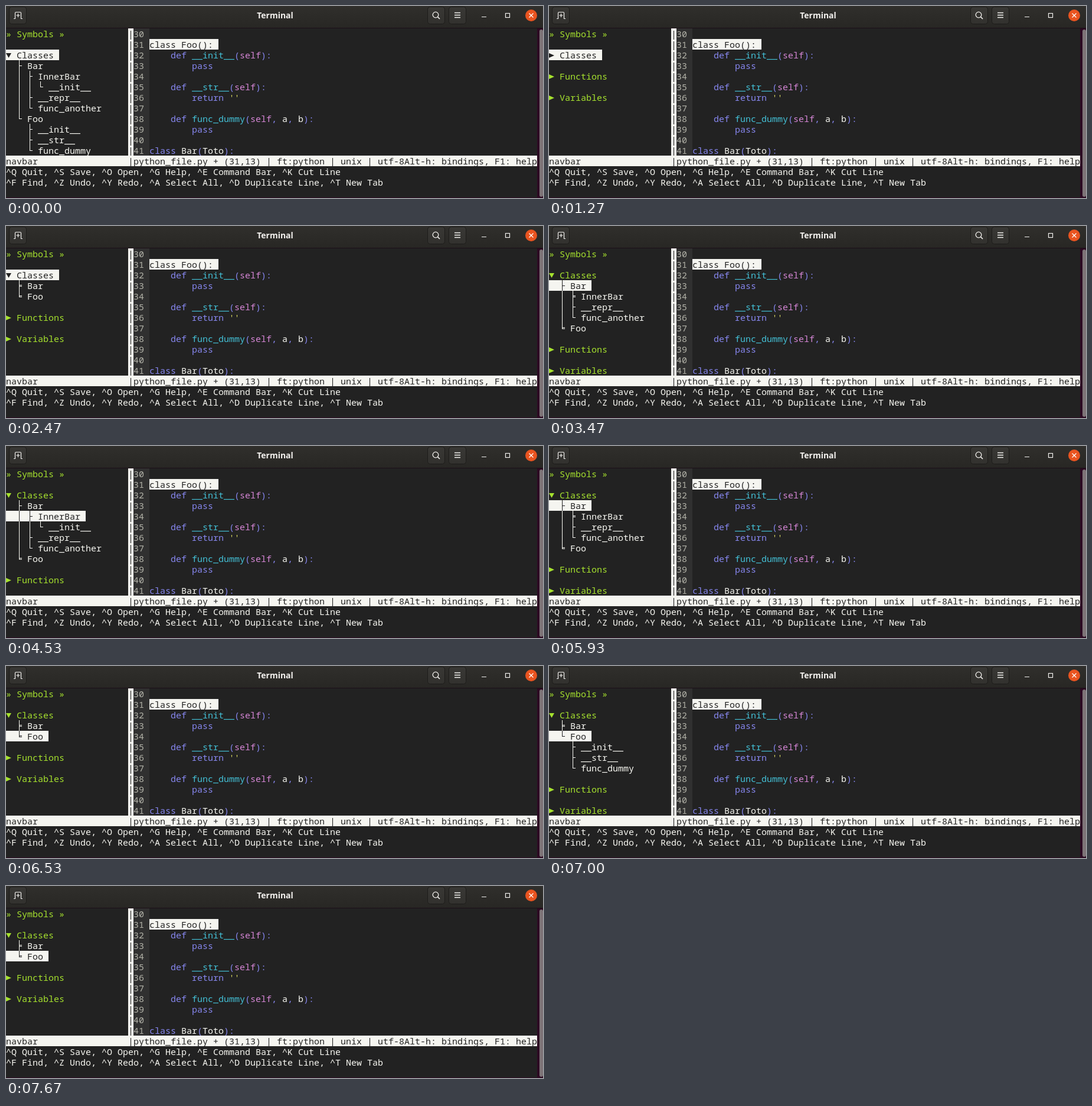
An HTML page for the animation above (8000 ms loop, 910 by 326 pixels).

```html
<!DOCTYPE html>
<html lang="en">
<head>
<meta charset="utf-8">
<title>Symbol browser</title>
<style>
html, body { margin: 0; width: 100%; height: 100%; overflow: hidden; background: #2c0a22; }
svg { display: block; width: 910px; height: 326px; }
.term text { font: 15px "Noto Sans Mono", "DejaVu Sans Mono", monospace; white-space: pre; }
.title { font: bold 14px "Noto Sans", "Open Sans", sans-serif; fill: #f3f1ee; }
</style>
</head>
<body>
<svg viewBox="0 0 910 326">
  <defs>
    <linearGradient id="bar" x2="0" y2="1">
      <stop stop-color="#302f2c"/><stop offset="1" stop-color="#282724"/>
    </linearGradient>
    <linearGradient id="btn" x2="0" y2="1">
      <stop stop-color="#393835"/><stop offset="1" stop-color="#32312e"/>
    </linearGradient>
  </defs>
  <rect width="910" height="326" fill="#2c0a22"/>
  <rect width="910" height="37" fill="url(#bar)"/>
  <rect y="37" width="910" height="1" fill="#1c0f18"/>
  <text class="title" x="456" y="21" text-anchor="middle">Terminal</text>
  <g fill="url(#btn)" stroke="#1d1c1a">
    <rect x="5.5" y="1.5" width="29" height="29" rx="4"/>
    <rect x="714.5" y="1.5" width="29" height="29" rx="4"/>
    <rect x="750.5" y="1.5" width="29" height="29" rx="4"/>
  </g>
  <g fill="none" stroke="#f3f1ee">
    <path d="M13 21.5H15.5V12Q15.5 10.5 17 10.5H24Q25.5 10.5 25.5 12V21.5H28M20.5 13V19M17.5 16H23.5" stroke-width="1.2"/>
    <circle cx="728" cy="15" r="4.8" stroke-width="1.3"/>
    <path d="M731.5 18.5L735 22" stroke-width="1.7"/>
    <path d="M760 11.5H770M760 15.5H770M760 19.5H770" stroke-width="1.4"/>
    <path d="M806 18.5H814"/>
    <rect x="846.5" y="12.5" width="7" height="7" stroke-width="1.2"/>
  </g>
  <circle cx="890" cy="16" r="10" fill="#e95420"/>
  <path d="M886.5 12.5L893.5 19.5M893.5 12.5L886.5 19.5" stroke="#fff" stroke-width="1.3"/>
  <rect y="38" width="900" height="287" fill="#222"/>
  <rect x="904" y="40" width="6" height="284" rx="3" fill="#7d7377"/>
  <g class="term" id="tree"></g>
  <g class="term" id="still"></g>
</svg>
<script>
const CW = 9, RH = 18, TOP = 38, ROWS = 12;
const WHITE = '#f8f8f2', DARK = '#222', PALE = '#f5f5f0', GREEN = '#a6e22e';
const BLUE = '#8787f0', CYAN = '#43c0d6', PINK = '#d787d7', YELLOW = '#d7d75f', GREY = '#b2b2a8';

const rowY = row => TOP + row * RH;
const esc = s => s.replace(/&/g, '&amp;').replace(/</g, '&lt;');
const text = (col, row, s, fill = WHITE) =>
  `<text x="${col * CW}" y="${rowY(row) + 15}" fill="${fill}">${esc(s)}</text>`;
const block = (col, row, cols, rows, fill) =>
  `<rect x="${col * CW}" y="${rowY(row)}" width="${cols * CW}" height="${rows * RH}" fill="${fill}"/>`;

// Editor pane, status line and help
const code = [
  '', 'class Foo():', '    def __init__(self):', '        pass', '',
  '    def __str__(self):', "        return ''", '',
  '    def func_dummy(self, a, b):', '        pass', '', 'class Bar(Toto):'
];

function tokenColor(s, prev) {
  if (/^(class|def|pass|return)$/.test(s)) return BLUE;
  if (s === 'self') return PINK;
  if (s[0] === "'") return YELLOW;
  if (/\W/.test(s)) return BLUE;
  return prev === 'def' ? CYAN : WHITE;
}

function codeLine(line, row) {
  if (row === 1) return block(27, row, 13, 1, PALE) + text(27, row, line, DARK);
  let prev = '';
  return [...line.matchAll(/\w+|'+|[^\w\s']+/g)].map(m => {
    const out = text(27 + m.index, row, m[0], tokenColor(m[0], prev));
    prev = m[0];
    return out;
  }).join('');
}

document.getElementById('still').innerHTML =
  block(23, 0, 1, ROWS, PALE) + block(24, 0, 3, ROWS, '#303030') +
  code.map((line, i) =>
    text(23, i, '|', DARK) + text(24, i, String(30 + i), GREY) + codeLine(line, i)).join('') +
  block(0, 12, 100, 1, PALE) + text(0, 12, 'navbar', DARK) +
  text(23, 12, '|python_file.py + (31,13) | ft:python | unix | utf-8Alt-h: bindings, F1: help', DARK) +
  text(0, 13, '^Q Quit, ^S Save, ^O Open, ^G Help, ^E Command Bar, ^K Cut Line') +
  text(0, 14, '^F Find, ^Z Undo, ^Y Redo, ^A Select All, ^D Duplicate Line, ^T New Tab');

// Symbol tree
const node = (name, ...kids) => ({ name, kids });
const classes = node('Classes',
  node('Bar',
    node('InnerBar', node('__init__')),
    node('__repr__'), node('func_another')),
  node('Foo', node('__init__'), node('__str__'), node('func_dummy')));

// [start ms, selected node, open nodes]
const steps = [
  [0, 'Classes', 'Classes Bar InnerBar Foo'],
  [1270, 'Classes', ''],
  [2470, 'Classes', 'Classes'],
  [3000, 'Bar', 'Classes'],
  [3470, 'Bar', 'Classes Bar'],
  [4000, 'InnerBar', 'Classes Bar'],
  [4530, 'InnerBar', 'Classes Bar InnerBar'],
  [5130, 'InnerBar', 'Classes Bar'],
  [5930, 'Bar', 'Classes Bar'],
  [6000, 'Bar', 'Classes'],
  [6530, 'Foo', 'Classes'],
  [7000, 'Foo', 'Classes Foo'],
  [7670, 'Foo', 'Classes']
];

function arrow(row, open, fill) {
  const y = rowY(row);
  return `<path d="${open ? `M0 ${y + 6}h9l-4.5 8z` : `M0 ${y + 6}l9 4-9 4z`}" fill="${fill}"/>`;
}

function branch(depth, row, last, folded, stroke) {
  const x = depth * 2 * CW + 4.5, y = rowY(row);
  const arms = (folded ? [8.5, 10.5] : [9.5]).map(d => `M${x} ${y + d}h4.5`).join('');
  const end = last ? (folded ? 11 : 10) : RH;
  return `<path d="M${x} ${y}v${end}${arms}" stroke="${stroke}" fill="none"/>`;
}

const stem = (depth, row, stroke) =>
  `<path d="M${depth * 2 * CW + 4.5} ${rowY(row)}v${RH}" stroke="${stroke}"/>`;

function drawTree([, selected, openList]) {
  const open = openList.split(' ');
  let row = 2, out = text(0, 0, '» Symbols »', GREEN);

  function heading(item) {
    if (row >= ROWS) return;
    const on = item.name === selected, fill = on ? DARK : GREEN;
    if (on) out += block(0, row, item.name.length + 3, 1, PALE);
    out += arrow(row, open.includes(item.name), fill) + text(2, row, item.name, fill);
    row++;
    if (open.includes(item.name)) children(item, 1, []);
    row++;
  }

  function children(parent, depth, stems) {
    parent.kids.forEach((item, i) => {
      if (row >= ROWS) return;
      const last = i === parent.kids.length - 1, isOpen = open.includes(item.name);
      const on = item.name === selected, fill = on ? DARK : WHITE, col = 2 + 2 * depth;
      if (on) out += block(0, row, col + item.name.length + 1, 1, PALE);
      out += stems.map(d => stem(d, row, fill)).join('') +
        branch(depth, row, last, item.kids.length && !isOpen, fill) +
        text(col, row, item.name, fill);
      row++;
      if (isOpen) children(item, depth + 1, last ? stems : [...stems, depth]);
    });
  }

  [classes, node('Functions'), node('Variables')].forEach(heading);
  return out;
}

const tree = document.getElementById('tree');
const start = performance.now();
let shown;

function frame() {
  const t = (performance.now() - start) % 8000;
  const step = steps.findLast(s => s[0] <= t);
  if (step !== shown) tree.innerHTML = drawTree(shown = step);
  requestAnimationFrame(frame);
}
frame();
</script>
</body>
</html>
```
